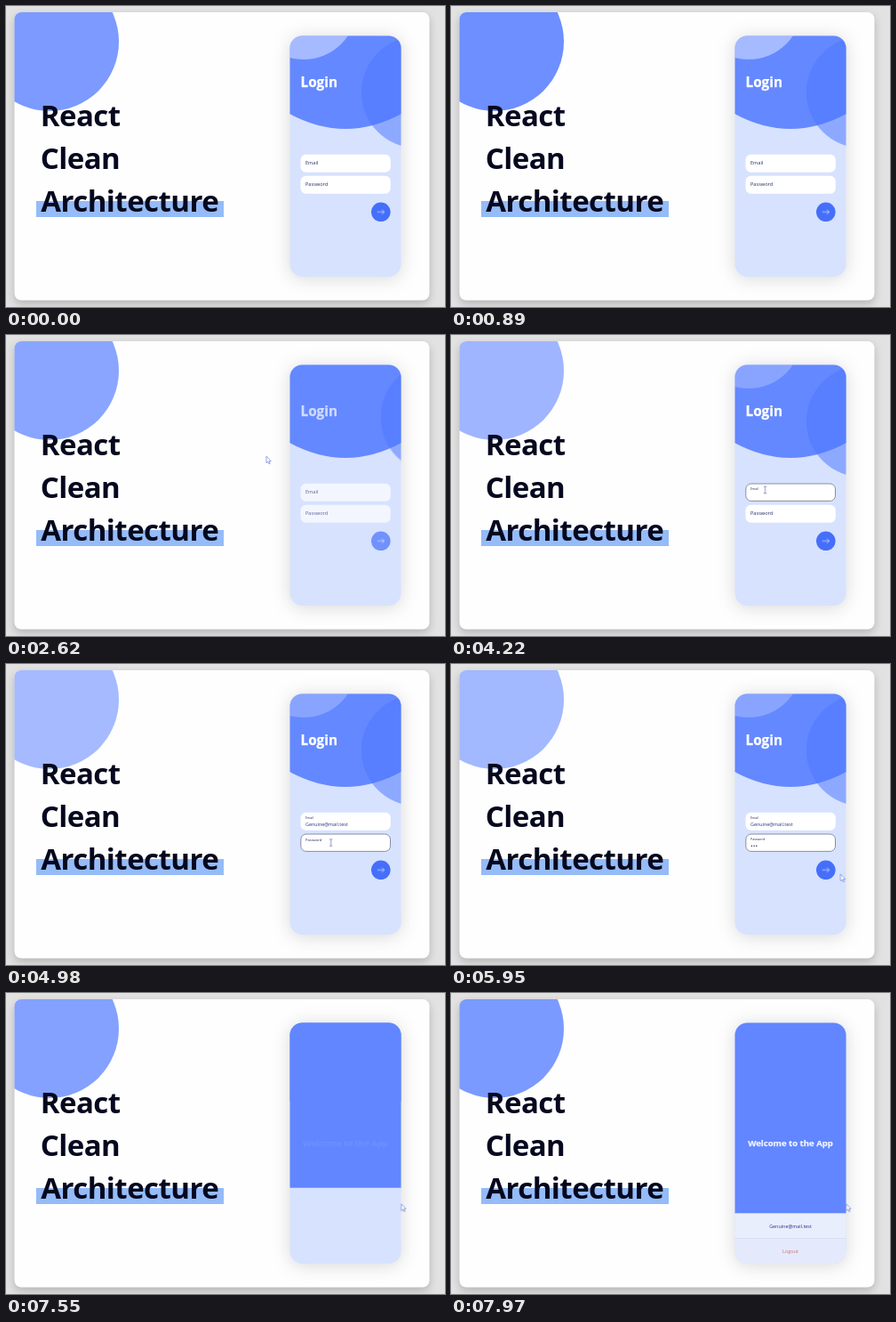
An HTML page for the animation above (8 s loop, 494 by 338 pixels).

```html
<!DOCTYPE html>
<html lang="en">
<head>
<meta charset="utf-8">
<title>Login demo</title>
<style>
html, body { margin: 0; width: 100%; height: 100%; overflow: hidden; background: #e2e2e2; }
svg { display: block; width: 494px; height: 338px; font-family: "Open Sans", "Noto Sans", sans-serif; }

.card { fill: #fefefe; filter: drop-shadow(0 4px 5px rgba(0, 0, 0, .2)); }
.phone { fill: #d7e2ff; filter: drop-shadow(0 2px 10px rgba(0, 0, 0, .15)); }
.title { font-size: 33px; font-weight: 700; letter-spacing: -.55px; fill: #05081e; }
.small { font-size: 5.6px; fill: #202b66; }
.value { font-size: 5.4px; fill: #27308a; }
.bold { font-weight: 700; fill: #fff; stroke: #fff; stroke-width: .25; }
.ring { fill: none; stroke: #4a5375; stroke-width: .65; }
.line { fill: none; stroke: #fff; stroke-width: .6; stroke-linecap: round; stroke-linejoin: round; }

/* Every part shares the same 8 s timeline. */
.anim { animation: 8s linear infinite; }
.pulse { animation-name: pulse; }
.header { animation-name: header; }
.deco-left { animation-name: deco-left; }
.deco-right { animation-name: deco-right; }
.form { animation-name: form; }
.email-label { animation-name: email-label; }
.pass-label { animation-name: pass-label; }
.email-ring { animation-name: email-ring; }
.pass-ring { animation-name: pass-ring; }
.typed { animation-name: typed; }
.dots { animation-name: dots; }
.arrow { animation-name: arrow; }
.loading { animation-name: loading; }
.home { animation-name: home; }
.welcome { animation-name: welcome; }
.menu { animation-name: menu; }
.cursor { animation-name: cursor; }
.pointer { animation-name: pointer; }
.ibeam { animation-name: ibeam; }
.spin { animation: spin .8s linear infinite; }
.email-ring, .pass-ring, .arrow, .loading, .pointer, .ibeam { animation-timing-function: step-end; }

@keyframes pulse {
  0% { opacity: .75 } 12% { opacity: .84 } 24% { opacity: .8 } 32.75% { opacity: .67 }
  52.75% { opacity: .55 } 66% { opacity: .5 } 74.4% { opacity: .53 } 90% { opacity: .65 } 100% { opacity: .76 }
}
@keyframes header {
  0%, 11.25% { transform: none; opacity: 1 }
  15.6% { transform: none; opacity: 0 }
  25.9% { transform: translateY(-108px); opacity: 0 }
  26% { transform: translateY(-108px); opacity: 1; animation-timing-function: ease-out }
  31.25%, 95.6% { transform: none; opacity: 1 }
  95.7%, 100% { transform: none; opacity: 0 }
}
@keyframes deco-left {
  0%, 11.25% { transform: none; opacity: .42 }
  15.6% { transform: none; opacity: 0 }
  32.9% { transform: translate(-55px, -55px); opacity: 0 }
  33% { transform: translate(-55px, -55px); opacity: .24; animation-timing-function: ease-out }
  41%, 91.25% { transform: none; opacity: .24 }
  93%, 100% { transform: none; opacity: 0 }
}
@keyframes deco-right {
  0%, 11.25% { transform: none; opacity: .53 }
  15.6% { transform: none; opacity: 0 }
  27.9% { transform: translate(50px, -10px); opacity: 0 }
  28% { transform: translate(50px, -10px); opacity: .53; animation-timing-function: ease-out }
  40%, 91.25% { transform: none; opacity: .53 }
  93%, 100% { transform: none; opacity: 0 }
}
@keyframes form {
  0%, 11.25% { opacity: 1 } 15.6%, 27.5% { opacity: 0 }
  35%, 91.25% { opacity: 1 } 93%, 100% { opacity: 0 }
}
@keyframes email-label {
  0%, 46% { transform: translate(337px, 178.4px) }
  47.5%, 100% { transform: translate(337px, 173.6px) scale(.64) }
}
@keyframes pass-label {
  0%, 61.2% { transform: translate(337px, 202.4px) }
  62.6%, 100% { transform: translate(337px, 197.6px) scale(.64) }
}
@keyframes email-ring { 0% { opacity: 0 } 46% { opacity: 1 } 61.2%, 100% { opacity: 0 } }
@keyframes pass-ring { 0% { opacity: 0 } 61.2% { opacity: 1 } 78%, 100% { opacity: 0 } }
@keyframes typed {
  0% { transform: scaleX(0) }
  54.4% { transform: scaleX(0); animation-timing-function: steps(17) }
  60%, 100% { transform: scaleX(1) }
}
@keyframes dots {
  0% { transform: scaleX(0) }
  65% { transform: scaleX(0); animation-timing-function: steps(3) }
  70%, 100% { transform: scaleX(1) }
}
@keyframes arrow { 0% { opacity: 1 } 78%, 100% { opacity: 0 } }
@keyframes loading { 0% { opacity: 0 } 78%, 100% { opacity: 1 } }
@keyframes spin { to { transform: rotate(360deg) } }
@keyframes home {
  0%, 91.6% { transform: translateY(-216px); animation-timing-function: ease-out }
  95.6%, 100% { transform: none }
}
@keyframes welcome { 0%, 94% { opacity: 0 } 99.3%, 100% { opacity: .92 } }
@keyframes menu {
  0%, 94.4% { transform: translateY(57px); opacity: 0; animation-timing-function: ease-out }
  99.3%, 100% { transform: none; opacity: 1 }
}
@keyframes cursor {
  0%, 18.75% { transform: translate(262px, 84px) }
  24% { transform: translate(270.8px, 95.5px) }
  28% { transform: translate(274px, 104px) }
  32.75% { transform: translate(292.8px, 136px) }
  41% { transform: translate(345px, 165px) }
  44%, 60% { transform: translate(353.5px, 174px) }
  61.2% { transform: translate(362px, 200px) }
  72.5% { transform: translate(400px, 206px) }
  74.3%, 77% { transform: translate(438.3px, 236px) }
  80%, 100% { transform: translate(444.7px, 236.8px) }
}
@keyframes pointer { 0% { opacity: 0 } 18.75% { opacity: 1 } 42.5% { opacity: 0 } 73%, 100% { opacity: 1 } }
@keyframes ibeam { 0% { opacity: 0 } 42.5% { opacity: 1 } 73%, 100% { opacity: 0 } }
</style>
</head>
<body>
<svg viewBox="0 0 494 338">
  <defs>
    <clipPath id="card"><rect x="9.5" y="7" width="467" height="323.5" rx="8"/></clipPath>
    <clipPath id="screen"><rect x="319.5" y="33.5" width="125" height="270.5" rx="14"/></clipPath>
    <clipPath id="email"><rect class="anim typed" width="52" height="12" y="-8"/></clipPath>
    <clipPath id="secret"><rect class="anim dots" width="8.4" height="6" y="-3"/></clipPath>
  </defs>

  <rect class="card" x="9.5" y="7" width="467" height="323.5" rx="8"/>
  <g clip-path="url(#card)">
    <circle class="anim pulse" cx="49" cy="40" r="78" fill="#5079ff"/>
  </g>

  <rect x="34" y="219" width="211" height="18" fill="#95bbf8"/>
  <g class="title">
    <text x="38.8" y="134.8">React</text>
    <text x="38.8" y="182.8">Clean</text>
    <text x="39.3" y="230.8">Architecture</text>
  </g>

  <rect class="phone" x="319.5" y="33.5" width="125" height="270.5" rx="14"/>
  <g clip-path="url(#screen)">
    <path class="anim header" d="M319 33H445V121Q382 155 319 121Z" fill="#6488ff"/>
    <circle class="anim deco-left" cx="335" cy="0" r="60" fill="#fff"/>
    <circle class="anim deco-right" cx="462.5" cy="97" r="62.5" fill="#4d77ff"/>

    <g class="anim form">
      <text class="bold" x="331.5" y="91" font-size="15.3">Login</text>
      <g fill="#fff">
        <rect x="331.5" y="166.7" width="101.3" height="20" rx="6"/>
        <rect x="331.5" y="190.7" width="101.3" height="20" rx="6"/>
      </g>
      <rect class="ring anim email-ring" x="331.8" y="167" width="100.7" height="19.4" rx="6"/>
      <rect class="ring anim pass-ring" x="331.8" y="191" width="100.7" height="19.4" rx="6"/>
      <text class="small anim email-label">Email</text>
      <text class="small anim pass-label">Password</text>
      <g transform="translate(337 181.5)"><text class="value" clip-path="url(#email)">Genuine@mail.test</text></g>
      <g transform="translate(337 204.3)">
        <g clip-path="url(#secret)" fill="#20264f">
          <circle cx="1.4" r=".75"/><circle cx="4.1" r=".75"/><circle cx="6.8" r=".75"/>
        </g>
      </g>
      <g transform="translate(421.8 231.3)">
        <circle r="10.8" fill="#456ffb"/>
        <path class="line anim arrow" d="M-3.7 0H3.7M1.4-2.3L3.7 0L1.4 2.3"/>
        <g class="anim loading"><path class="line spin" d="M0-3.6A3.6 3.6 0 1 1-3.6 0"/></g>
      </g>
    </g>

    <rect class="anim home" x="319" y="33" width="126" height="214.5" fill="#6186ff"/>
    <text class="bold anim welcome" x="382" y="172.3" font-size="9.55" text-anchor="middle">Welcome to the App</text>
    <g class="anim menu" text-anchor="middle">
      <rect x="319" y="247.5" width="126" height="57" fill="#e9eefd"/>
      <rect x="319" y="275.5" width="126" height="29" fill="#e4eafb"/>
      <path d="M319 275.5H445" stroke="#d5dcf1" stroke-width=".7"/>
      <text class="value" x="382" y="263.8">Genuine@mail.test</text>
      <text x="382" y="292.2" font-size="5.6" fill="#c9707a">Logout</text>
    </g>
  </g>

  <g class="anim cursor">
    <path class="anim pointer" d="M0 0V7.6L1.8 6L3 8.7L4.2 8.2L3.1 5.6H5.3Z" fill="#fff" stroke="#6074d0" stroke-width=".65" stroke-linejoin="round"/>
    <path class="anim ibeam" d="M-1.5-3.8H1.5M0-3.8V3.8M-1.5 3.8H1.5" fill="none" stroke="#5661a0" stroke-width=".7"/>
  </g>
</svg>
</body>
</html>
```
